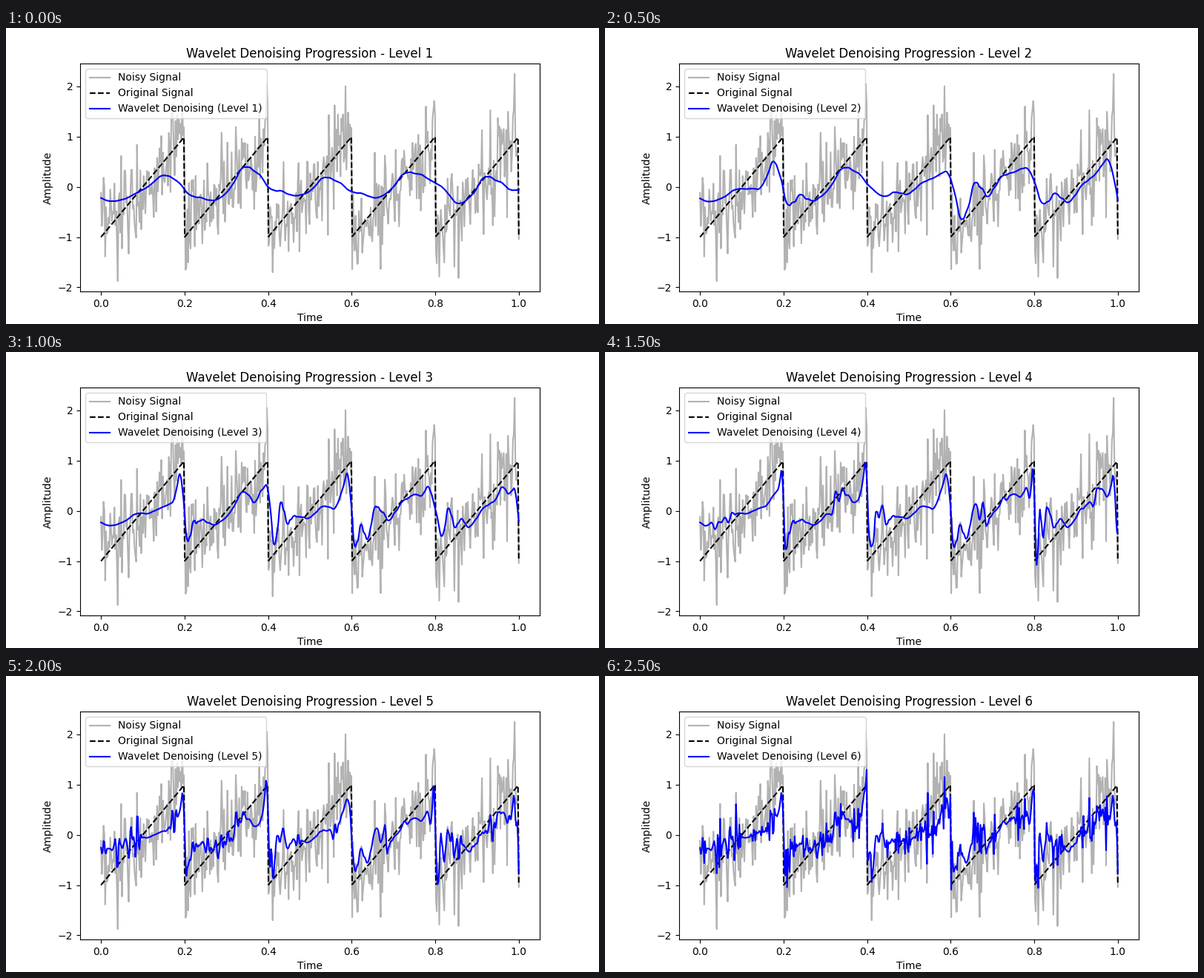
A matplotlib script that plays this animation: 800x400 px, repeating every 3 s.

```python
import math

import matplotlib.pyplot as plt
import numpy as np
from matplotlib.animation import FuncAnimation

LEVELS = 6


def daubechies(moments):
    """Minimum phase low-pass filter with the given vanishing moments."""
    poly = [math.comb(moments - 1 + k, k) for k in range(moments)]
    zeros = [-1] * moments
    for y in np.roots(poly[::-1]):
        pair = np.roots([1, 4 * y - 2, 1])
        zeros.append(min(pair, key=abs))
    taps = np.real(np.poly(zeros))
    return taps * math.sqrt(2) / taps.sum()


REC_LO = daubechies(4)
DEC_LO = REC_LO[::-1]
REC_HI = DEC_LO * (-1.0) ** np.arange(len(DEC_LO))
DEC_HI = REC_HI[::-1]


def analyse(x, taps):
    padded = np.pad(x, len(taps) - 1, mode="symmetric")
    return np.convolve(padded, taps, mode="valid")[1::2]


def synthesise(c, taps):
    up = np.zeros(2 * len(c))
    up[::2] = c
    return np.convolve(up, taps)[len(taps) - 2:len(up)]


def decompose(x):
    """Return the coarse part and the details, coarsest first."""
    details = []
    for _ in range(LEVELS):
        details.insert(0, analyse(x, DEC_HI))
        x = analyse(x, DEC_LO)
    return x, details


def shrink(c):
    """Soft threshold at the robust noise estimate of the band."""
    limit = np.median(np.abs(c)) / 0.6745
    return np.sign(c) * np.maximum(np.abs(c) - limit, 0)


def denoise(x, level):
    """Rebuild x from its shrunken coarse part and first few details."""
    coarse, details = decompose(x)
    out = shrink(coarse)
    for i, d in enumerate(details):
        out = synthesise(out[:len(d)], REC_LO)
        if i < level:
            out = out + synthesise(shrink(d), REC_HI)
    return out


np.random.seed(0)
t = np.linspace(0, 1, 500)
clean = 2 * ((5 * t) % 1) - 1
noisy = clean + 0.5 * np.random.randn(t.size)

fig, ax = plt.subplots(figsize=(8, 4), dpi=100)


def draw(i):
    level = i + 1
    ax.clear()
    ax.plot(t, noisy, color="gray", alpha=0.6, label="Noisy Signal")
    ax.plot(t, clean, "k--", label="Original Signal")
    ax.plot(t, denoise(noisy, level), color="blue",
            label=f"Wavelet Denoising (Level {level})")
    ax.set_title(f"Wavelet Denoising Progression - Level {level}")
    ax.set_xlabel("Time")
    ax.set_ylabel("Amplitude")
    ax.legend(loc="upper left")


anim = FuncAnimation(fig, draw, frames=LEVELS, interval=500, repeat=True,
                     repeat_delay=0, init_func=lambda: None)
plt.show()
```
